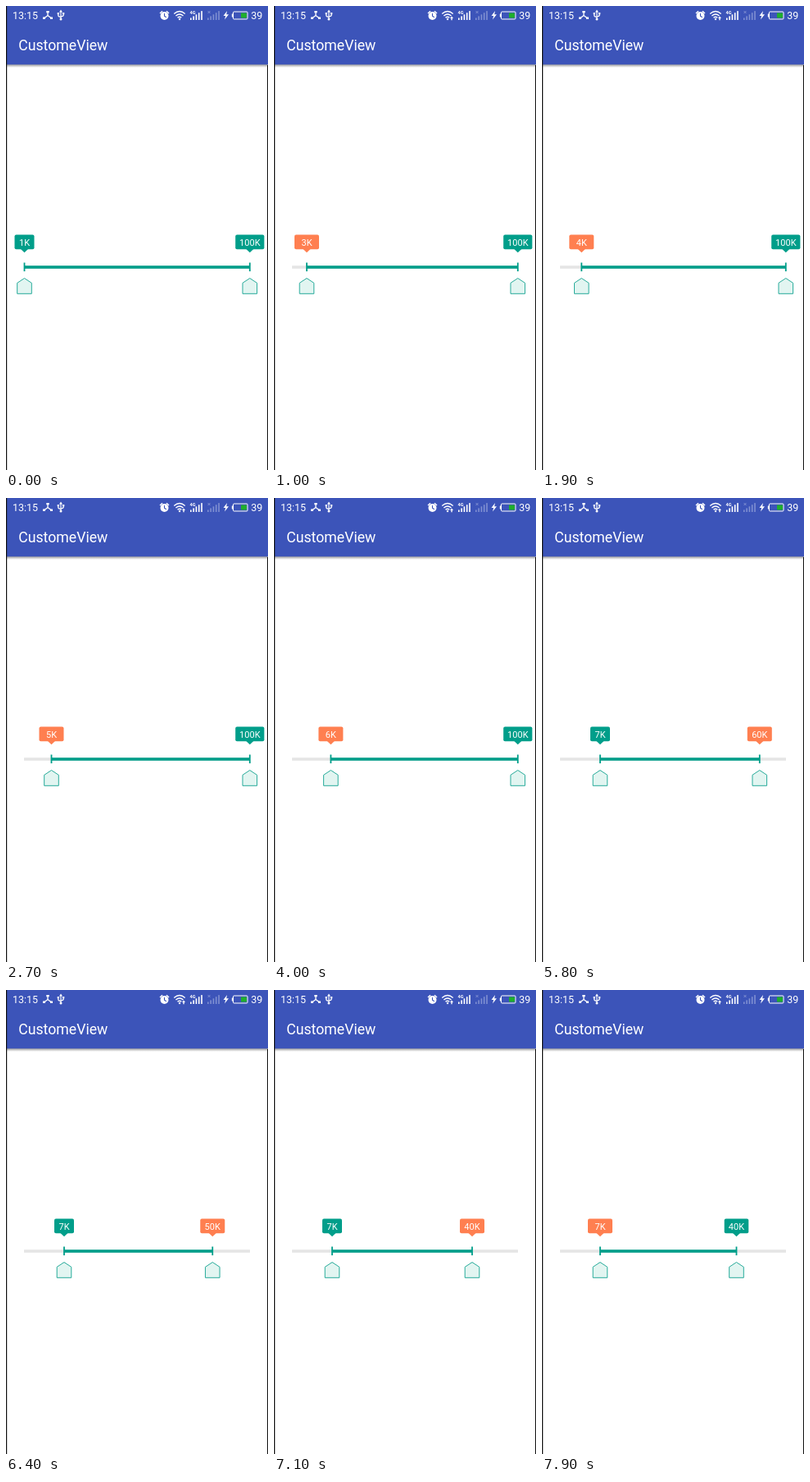
Write an HTML page that moves like this. It is 320 by 565 pixels and loops after 8000 ms.

```html
<!DOCTYPE html>
<html lang="en">
<head>
<meta charset="utf-8">
<title>Range slider</title>
<style>
html, body { margin: 0; width: 100%; height: 100%; overflow: hidden; background: #fff; }
svg { display: block; width: 100vw; height: 100vh; }
text { font-family: Roboto, "Noto Sans", sans-serif; fill: #fff; }
.line { fill: none; stroke: #fff; }
</style>
</head>
<body>
<svg viewBox="0 0 320 565">
  <defs>
    <linearGradient id="shade" x2="0" y2="1">
      <stop stop-color="#999"/>
      <stop offset="1" stop-color="#fff"/>
    </linearGradient>
  </defs>
  <rect width="320" height="565" fill="#fff"/>
  <rect y="71" width="320" height="4" fill="url(#shade)"/>
  <rect width="320" height="71.3" fill="#3c54b9"/>
  <text x="15.2" y="54" font-size="17.7">CustomeView</text>

  <g id="status">
    <text x="8" y="16" font-size="12.5">13:15</text>
    <path class="line" stroke-width="1.3" d="M51 6.5V11.5L46.5 15M51 11.5L55.500 15"/>
    <path fill="#fff" d="M49.300 6h3.400v2.200h-3.400zM45 13.500h3v2.500h-3zM54 13.500h3v2.500h-3z"/>
    <path class="line" stroke-width="1.2" d="M67 7V16M63.800 9V11.500Q63.800 13 67 13.500M70.200 9V11Q70.200 12.500 67 13"/>
    <path fill="#fff" d="M67 4.500l2 3h-4zM62.700 8h2.300v2.300h-2.300zM69 8h2.300v2.300h-2.300z"/>
    <circle cx="67" cy="16" r="1.500" fill="#fff"/>

    <circle cx="193.500" cy="12" r="5" fill="#fff"/>
    <path class="line" stroke-width="1.500" d="M188 9l3-2.700M199 9l-3-2.700"/>
    <path fill="none" stroke="#3c54b9" stroke-width="1.100" d="M193.500 9v3.300l2.300 1.500"/>

    <path class="line" stroke-width="1.300" d="M205.200 9.500Q212 3.500 218.700 9.500M207.400 12Q212 8 216.500 12M209.500 14.300Q212 12.200 214.300 14.300"/>
    <circle cx="212" cy="16" r="1.200" fill="#fff"/>
    <path id="arrow" fill="#fff" d="M217 12.500l2 2.500h-1.300v2.300h-1.400v-2.300h-1.300z"/>

    <text x="224.500" y="10" font-size="5.500" font-weight="700">4G</text>
    <g id="bars"></g>
    <path class="line" stroke-width=".8" opacity=".4" d="M246.500 6l3 3M249.500 6l-3 3"/>
    <path fill="#fff" d="M270 6l-4.500 6h2.700l-1.200 4.500 5-6.200h-2.800z"/>
    <rect class="line" x="277.500" y="7" width="17.500" height="9" rx="1"/>
    <rect x="275.800" y="9.500" width="1.500" height="4" fill="#fff"/>
    <rect x="287" y="8.500" width="7" height="6" fill="#1fae2c"/>
    <text x="299.300" y="16" font-size="12.500">39</text>
  </g>

  <rect x="22" y="316.200" width="276" height="3.600" fill="#e5e5e5"/>
  <rect id="span" y="316.200" height="3.600" fill="#009e8a"/>
  <g id="low"></g>
  <g id="high"></g>
  <path fill="#111" d="M0 0H1.200V565H0zM319 72H320V565H319z"/>
</svg>
<script>
const LOOP = 8000, STEP = 100;
const MIN_X = 22.5, MAX_X = 297.8;
const GREEN = "#009e8a", ORANGE = "#ff7f50";
const NS = "http://www.w3.org/2000/svg";
const byId = id => document.getElementById(id);

// [time, x] points of each drag
const lowPath = [[100, 22.5], [300, 27], [600, 35], [700, 35], [1000, 40],
  [1600, 45.8], [2500, 53.3], [2700, 55.5], [3400, 63], [4000, 69.4], [4200, 71]];
const highPath = [[4500, 297.8], [4700, 294], [5300, 279], [5800, 265.8],
  [6200, 256], [6600, 248.5], [7100, 242], [7600, 237.5]];

function add(parent, tag, attrs) {
  const el = document.createElementNS(NS, tag);
  for (const key in attrs) el.setAttribute(key, attrs[key]);
  return parent.appendChild(el);
}

function along(path, t) {
  if (t <= path[0][0]) return path[0][1];
  for (let i = 1; i < path.length; i++) {
    const [t0, a] = path[i - 1], [t1, b] = path[i];
    if (t <= t1) return a + (b - a) * (t - t0) / (t1 - t0);
  }
  return path[path.length - 1][1];
}

function makeThumb(id) {
  const group = byId(id);
  const box = add(group, "rect", { y: 278.5, height: 17.8, rx: 2 });
  const tip = add(group, "path", { d: "M-4.500 296H4.500L0 300.300Z" });
  const label = add(group, "text", { y: 292, "font-size": 11, "text-anchor": "middle" });
  add(group, "rect", { x: -0.9, y: 312.5, width: 1.8, height: 10.6, fill: GREEN });
  add(group, "path", {
    d: "M0 331.500L8.800 337.300V350.300H-8.800V337.300Z",
    fill: "#e2f5f1", stroke: "#27ab9a", "stroke-width": 1
  });
  return (x, value, active) => {
    const text = value + "K";
    const fitted = 24 + (text.length - 2) * 5.6;
    const width = active ? Math.max(30, fitted) : fitted;
    const color = active ? ORANGE : GREEN;
    group.setAttribute("transform", `translate(${x} 0)`);
    box.setAttribute("x", -width / 2);
    box.setAttribute("width", width);
    box.setAttribute("fill", color);
    tip.setAttribute("fill", color);
    label.textContent = text;
  };
}

function drawBars(x, opacity) {
  for (let i = 0; i < 5; i++) {
    const h = 2.5 + i * 2.1;
    add(byId("bars"), "rect", { x: x + i * 3.3, y: 17 - h, width: 1.6, height: h, fill: "#fff", opacity });
  }
}
drawBars(225, 1);
drawBars(246, 0.35);

const drawLow = makeThumb("low"), drawHigh = makeThumb("high");
const lowValue = x => Math.floor(1 + (x - MIN_X) / 8);
const highValue = x => Math.floor((100 - (MAX_X - x) / 1.02) / 10) * 10;

function render(ms) {
  const t = Math.floor(ms % LOOP / STEP) * STEP;
  const low = along(lowPath, t), high = along(highPath, t);
  drawLow(low, lowValue(low), t >= 100 && t < 4500 || t >= 7800);
  drawHigh(high, highValue(high), t >= 4500 && t < 7600);
  byId("span").setAttribute("x", low);
  byId("span").setAttribute("width", high - low);
  byId("arrow").setAttribute("visibility", t < 300 ? "hidden" : "visible");
}

const start = performance.now();
function tick() {
  render(performance.now() - start);
  requestAnimationFrame(tick);
}
tick();
</script>
</body>
</html>
```
